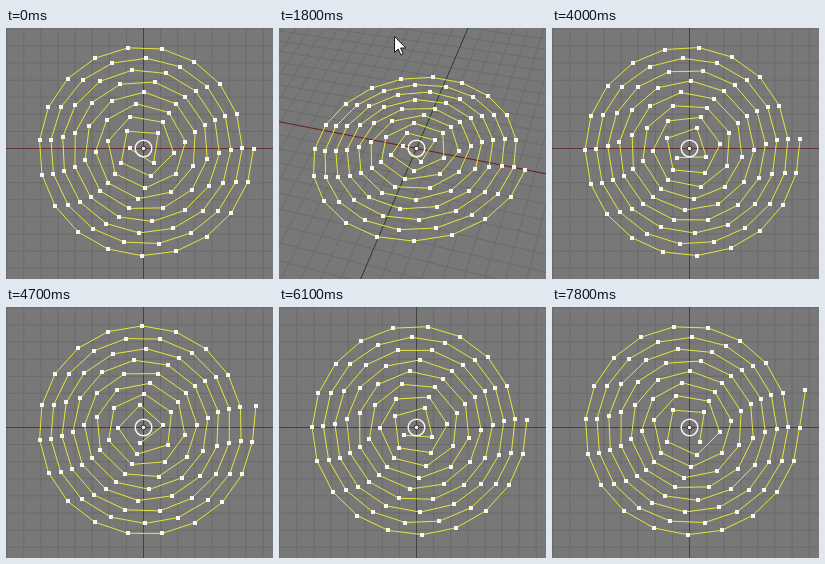
An HTML page with a canvas for the animation above (8000 ms loop, 267 px wide and 251 px high).

```html
<!DOCTYPE html>
<html lang="en">
<head>
<meta charset="utf-8">
<title>Spiral in a 3D viewport</title>
<style>
  html, body { margin: 0; width: 100%; height: 100%; overflow: hidden; background: #777; }
  canvas { display: block; }
</style>
</head>
<body>
<canvas id="stage" width="267" height="251"></canvas>
<script>
const ctx = document.getElementById('stage').getContext('2d');
const W = 267, H = 251, LOOP = 8000, STEP = 100;
const CX = 137.5, CY = 120.5, EYE = 650;
const CELL = 17.1, CELLS = 20;
const TAU = Math.PI * 2, RAD = Math.PI / 180;

// Spiral: radius grows with the angle, points lie at equal arc lengths.
const SEGMENTS = 96, PITCH = 11.3, GROWTH = PITCH / TAU;
const FIRST = 14 / GROWTH, LAST = FIRST + 8.5 * TAU;
const SQ_STEP = (LAST * LAST - FIRST * FIRST) / SEGMENTS;
const CYCLE = 22, GROW_START = 3400;

// Rows: time, then the values at that time.
const VIEW = [
  [1200, 0, 0, 0],
  [1800, 40.3, -25.8, 9.2],
  [2400, 26.7, 0, 13.3]
];
const POINTER = [
  [100, 204, 75], [400, 140, 92], [700, 177, 119], [1200, 177, 119],
  [1800, 115, 8], [2400, 177, 54], [2600, 177, 54], [2700, 166, 100], [2800, 208, 187]
];

function sample(rows, t) {
  if (t <= rows[0][0]) return rows[0].slice(1);
  for (let i = 1; i < rows.length; i++) {
    const a = rows[i - 1], b = rows[i];
    if (t <= b[0]) {
      const k = (t - a[0]) / (b[0] - a[0]);
      return a.slice(1).map((v, j) => v + (b[j + 1] - v) * k);
    }
  }
  return rows[rows.length - 1].slice(1);
}

function turn(x, y, angle) {
  const c = Math.cos(angle), s = Math.sin(angle);
  return [x * c - y * s, x * s + y * c];
}

function makeProjection([tilt, azimuth, roll]) {
  const c = Math.cos(tilt * RAD), s = Math.sin(tilt * RAD);
  return (x, y) => {
    const [px, py] = turn(x, y, azimuth * RAD);
    const scale = EYE / (EYE + py * s);
    const [sx, sy] = turn(px * scale, py * c * scale, roll * RAD);
    return [CX + sx, CY - sy];
  };
}

function line(project, x1, y1, x2, y2) {
  ctx.moveTo(...project(x1, y1));
  ctx.lineTo(...project(x2, y2));
}

function strokeLine(color, ...args) {
  ctx.strokeStyle = color;
  ctx.beginPath();
  line(...args);
  ctx.stroke();
}

function drawFloor(project, isTop) {
  const far = CELL * CELLS;
  ctx.lineWidth = 1;
  ctx.strokeStyle = '#6b6b6b';
  ctx.beginPath();
  for (let i = -CELLS; i <= CELLS; i++) {
    const p = i * CELL;
    line(project, p, -far, p, far);
    line(project, -far, p, far, p);
  }
  ctx.stroke();
  strokeLine(isTop ? '#5e3434' : '#701c1c', project, -far, 0, far, 0);
  strokeLine(isTop ? '#3c443c' : '#1e481e', project, 0, -far, 0, far);
}

function spiralPoints(shift) {
  return Array.from({ length: SEGMENTS + 1 }, (_, i) => {
    const phi = Math.sqrt(FIRST * FIRST + (i + shift) * SQ_STEP);
    const flare = i === SEGMENTS ? PITCH * shift * shift : 0;
    const r = GROWTH * phi + flare, angle = phi - LAST;
    return [r * Math.cos(angle), r * Math.sin(angle)];
  });
}

function drawSpiral(project, shift) {
  const points = spiralPoints(shift).map(p => project(...p));
  ctx.strokeStyle = '#e6e63c';
  ctx.lineWidth = 1;
  ctx.beginPath();
  points.forEach(p => ctx.lineTo(...p));
  ctx.stroke();
  ctx.fillStyle = '#f6f6f0';
  for (const [x, y] of points) ctx.fillRect(Math.round(x) - 2, Math.round(y) - 2, 4, 4);
}

function drawCenter() {
  ctx.strokeStyle = '#f4f0ee';
  ctx.lineWidth = 1.5;
  ctx.beginPath();
  ctx.arc(CX, CY, 8.3, 0, TAU);
  ctx.stroke();
  ctx.fillStyle = '#f8eeee';
  ctx.strokeStyle = '#332b2b';
  ctx.lineWidth = 1;
  ctx.beginPath();
  ctx.arc(CX, CY, 2.3, 0, TAU);
  ctx.fill();
  ctx.stroke();
}

const arrow = new Path2D('M.5 .5V16.5L4.2 13 6.8 18.8 9.2 17.8 6.6 12H11.8Z');

function drawPointer(x, y) {
  ctx.save();
  ctx.translate(Math.round(x), Math.round(y));
  ctx.fillStyle = '#fff';
  ctx.strokeStyle = '#1a1a1a';
  ctx.lineWidth = 1;
  ctx.fill(arrow);
  ctx.stroke(arrow);
  ctx.restore();
}

function growth(t) {
  const k = Math.round((t - GROW_START) / STEP);
  return k < 1 ? 0 : (Math.min(k, 2 * CYCLE) - 1) % CYCLE / CYCLE + 1 / CYCLE;
}

function draw(time) {
  const t = Math.floor(time % LOOP / STEP) * STEP;
  const isTop = t <= 1200 || t >= 2500;
  const project = makeProjection(isTop ? [0, 0, 0] : sample(VIEW, t));
  ctx.fillStyle = '#787878';
  ctx.fillRect(0, 0, W, H);
  drawFloor(project, isTop);
  drawSpiral(project, growth(t));
  drawCenter();
  if (t >= 100 && t < 2900) drawPointer(...sample(POINTER, t));
}

let start;
function tick(now) {
  start ??= now;
  draw(now - start);
  requestAnimationFrame(tick);
}
draw(0);
requestAnimationFrame(tick);
</script>
</body>
</html>
```
